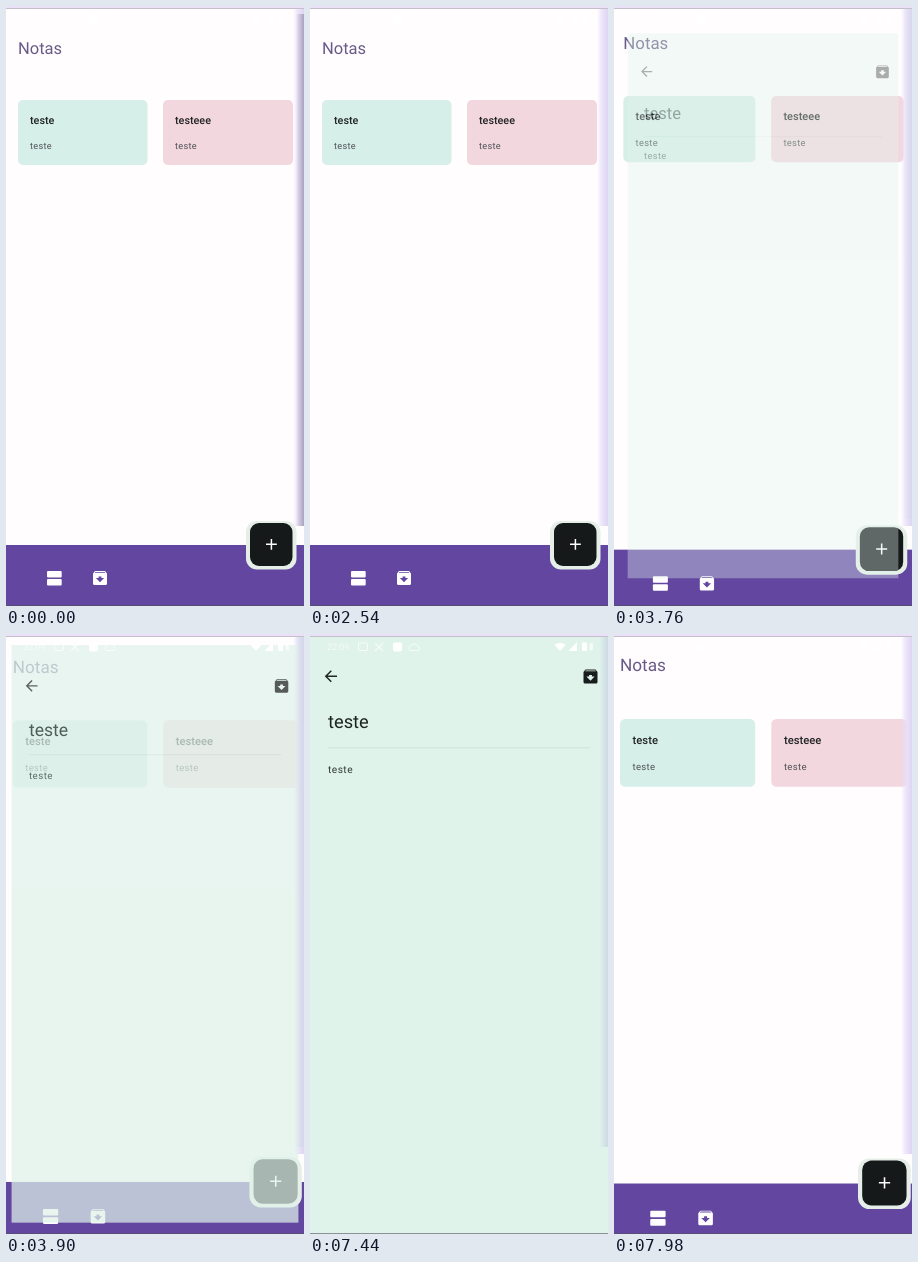
An HTML page for the animation above (8000 ms loop, 298 by 600 pixels).

```html
<!DOCTYPE html>
<html lang="pt">
<head>
<meta charset="utf-8">
<title>Notas</title>
<style>
  html, body { margin: 0; width: 100%; height: 100%; overflow: hidden; background: #fffdfe; }
  svg { display: block; width: 100%; height: 100%; }
  text { font-family: Roboto, "Noto Sans", sans-serif; text-rendering: geometricPrecision; }
  .cardTitle { font-size: 10.8px; font-weight: 500; fill: #222425; }
  .cardBody { font-size: 9.2px; letter-spacing: .3px; fill: #505456; }
</style>
</head>
<body>
<svg viewBox="0 0 298 600" preserveAspectRatio="none">
  <defs>
    <path id="archive" fill-rule="evenodd" d="M2 0H12L14 2.5V12.5Q14 14 12.5 14H1.5Q0 14 0 12.5V2.5ZM2.3 .9L1.6 1.7H12.4L11.7 .9ZM5.6 5.4V7H2.9L7 11.2L11.1 7H8.4V5.4Z"/>
    <linearGradient id="edge">
      <stop offset="0" stop-color="#e6def8" stop-opacity="0"/>
      <stop offset=".45" stop-color="#e6def8" stop-opacity=".8"/>
      <stop offset="1" stop-color="#ddd5f2"/>
    </linearGradient>
    <linearGradient id="edgeDark">
      <stop offset="0" stop-color="#9992ac" stop-opacity="0"/>
      <stop offset="1" stop-color="#9992ac" stop-opacity=".75"/>
    </linearGradient>
    <linearGradient id="edgeCool">
      <stop offset="0" stop-color="#cdd9e2" stop-opacity="0"/>
      <stop offset="1" stop-color="#cdd9e2"/>
    </linearGradient>
  </defs>

  <rect width="298" height="600" fill="#fffdfe"/>

  <g id="home">
    <text x="12" y="48" font-size="16.5" fill="#675c88">Notas</text>
    <rect x="12" y="94" width="129.5" height="65" rx="5" fill="#d7efe9"/>
    <text class="cardTitle" x="24" y="118">teste</text>
    <text class="cardBody" x="24" y="143">teste</text>
    <rect x="157" y="94" width="130" height="65" rx="5" fill="#f3d7df"/>
    <text class="cardTitle" x="169" y="118">testeee</text>
    <text class="cardBody" x="169" y="143">teste</text>
  </g>

  <rect x="287" width="11" height="520" fill="url(#edge)"/>
  <rect id="edgeShade" x="290" y="8" width="8" height="512" fill="url(#edgeDark)"/>

  <g id="bar">
    <rect x="-10" y="539" width="320" height="75" fill="#6246a0"/>
    <g fill="#fffdfe">
      <rect x="41" y="565" width="14.7" height="6.4" rx="1"/>
      <rect x="41" y="573" width="14.7" height="6.4" rx="1"/>
      <use href="#archive" x="87" y="565"/>
    </g>
    <rect x="240" y="515" width="50.5" height="48.5" rx="11" fill="#e5efe8"/>
    <rect x="244" y="517" width="42.5" height="43" rx="9" fill="#16191a"/>
    <path d="M260 538.3H270.8M265.4 532.9V543.7" stroke="#fff" stroke-width="1.5"/>
  </g>

  <g id="detail">
    <rect width="298" height="600" fill="#e0f3eb"/>
    <path d="M27 42.3H16M21.3 36.8L15.8 42.3L21.3 47.8" fill="none" stroke="#1f2826" stroke-width="1.5"/>
    <use href="#archive" x="273.5" y="35.5" fill="#161d1c"/>
    <text x="18" y="94" font-size="18.3" fill="#1c2422">teste</text>
    <path d="M18 113.8H280" stroke="#cde3dc"/>
    <text x="18" y="139" font-size="10.2" letter-spacing=".45" fill="#303a37">teste</text>
  </g>

  <g fill="#fff">
    <text x="17" y="16" font-size="9" opacity=".6">22:09</text>
    <rect x="48.5" y="9" width="9" height="7.5" rx="1.5" fill="none" stroke="#fff" opacity=".7"/>
    <path d="M65 9L73 17M73 9L65 17" stroke="#fff" stroke-width="1.2" opacity=".7"/>
    <rect x="83" y="8.500" width="9" height="9" rx="2"/>
    <path d="M100 16.500a3 3 0 0 1 1-5a4 4 0 0 1 7 1a2.500 2.500 0 0 1 1 4Z" fill="none" stroke="#fff" opacity=".7"/>
    <path d="M244.500 11Q250 6.500 255.500 11L250 17ZM267 8V17H258.500Z"/>
    <rect x="272" y="8.500" width="5" height="8.500" rx="1"/>
    <rect x="279.500" y="9" width="3.500" height="7.500" rx="1" opacity=".6"/>
  </g>
  <rect id="edgeDetail" x="289" y="3" width="9" height="510" fill="url(#edgeCool)"/>
  <rect width="298" height="2" fill="#eae0f7"/>
  <path d="M0 2.500H298" stroke="#c4bfca"/>
  <path d="M0 599.500H298" stroke="#55505f" stroke-opacity=".6"/>
</svg>

<script>
const LOOP = 8000;
const SHADE_END = 2540;
const el = id => document.getElementById(id);
const lerp = (a, b, k) => a + (b - a) * k;

// Each segment runs from start to end, then holds its last value.
const progressTrack = [
  [3220, 3360, .08, .285],
  [3520, 3760, .30, .39],
  [3900, 3900, .75, .75],
  [4040, 4320, .94, 1],
  [7540, 7680, 1, .96],
  [7860, 7980, .92, .88]
];
const fadeTrack = [
  [3520, 3760, 0, .36],
  [3900, 3900, .72, .72],
  [4040, 4040, 1, 1],
  [7540, 7680, .85, 0]
];

function sample(track, t) {
  let value = 0;
  for (const [start, end, from, to] of track) {
    if (t < start) break;
    value = end > start ? lerp(from, to, Math.min(1, (t - start) / (end - start))) : to;
  }
  return value;
}

function zoom(id, scale, cy) {
  el(id).setAttribute("transform", `translate(149 ${cy}) scale(${scale}) translate(-149 ${-cy})`);
}

function render(t) {
  const progress = sample(progressTrack, t);
  const fade = sample(fadeTrack, t);
  zoom("home", 1 + .05 * progress, 300);
  zoom("bar", 1 + .05 * progress, 300);
  zoom("detail", .85 + .15 * progress, 297);
  el("detail").setAttribute("opacity", fade);
  el("edgeDetail").setAttribute("opacity", fade);
  el("edgeShade").setAttribute("opacity", t < SHADE_END ? 1 : 0);
}

function tick(now) {
  render(now % LOOP);
  requestAnimationFrame(tick);
}
render(0);
requestAnimationFrame(tick);
</script>
</body>
</html>
```
